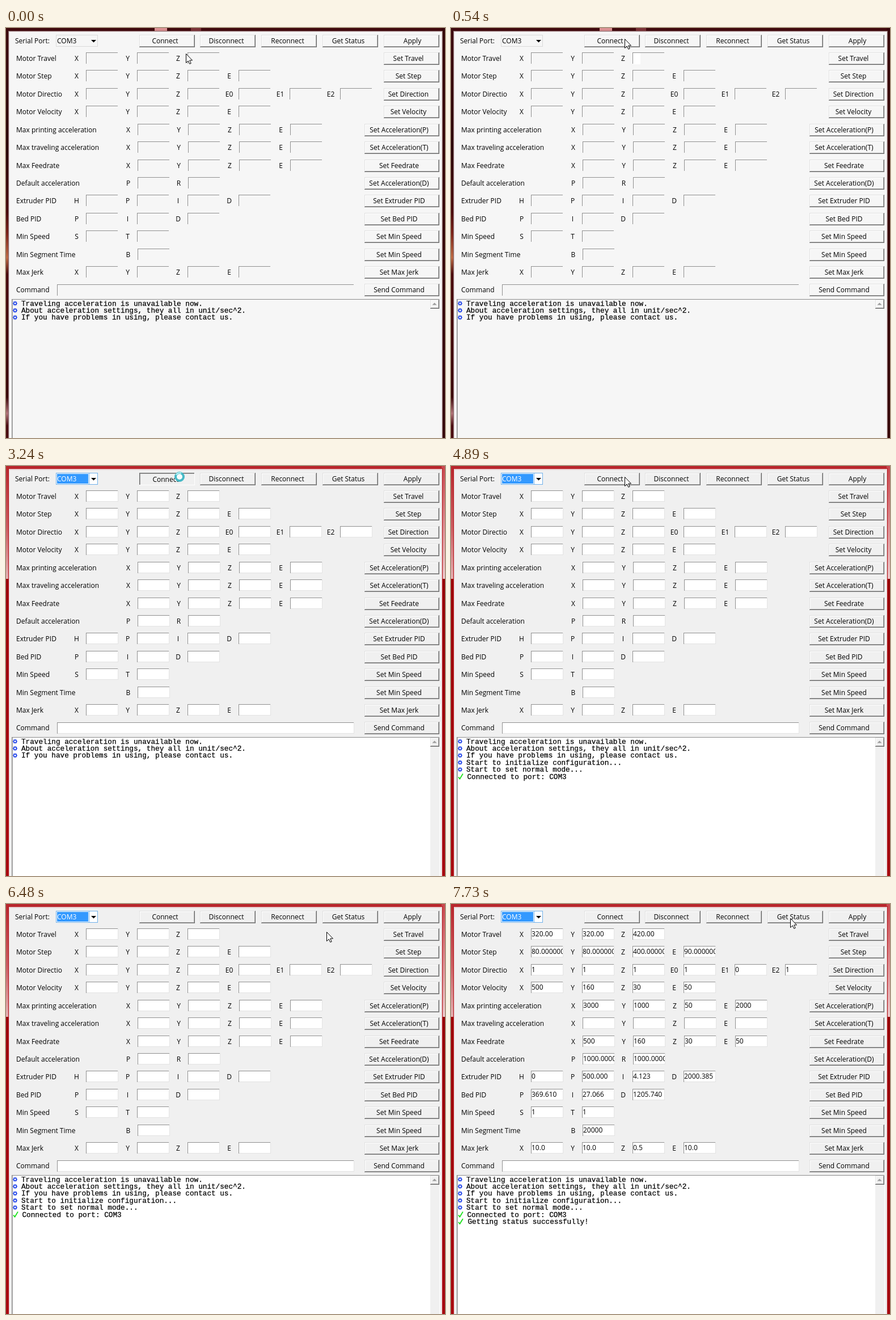
Animation, 774 px wide and 723 px high, one loop 8 s. Source, as an HTML page:

```html
<!DOCTYPE html>
<html lang="en">
<head>
<meta charset="utf-8">
<title>Printer settings</title>
<style>
html, body { margin: 0; width: 100%; height: 100%; overflow: hidden; background: #f0f0f0; }
svg { display: block; }
text { font: 12px "Open Sans", "Noto Sans", sans-serif; fill: #000; white-space: pre; }
.mid { text-anchor: middle; }
.log text { font: 12.69px "Liberation Mono", monospace; stroke: #000; stroke-width: .25; }
.gear { fill: none; stroke: #1238e8; stroke-width: 1.3; }
.tick { fill: none; stroke: #14e014; stroke-width: 1.8; }

.faded, .active, .patch, .down1, .up1, .busy, .arrow, .linked, .down2, .up2, .vals, .pid, #cursor {
  animation: 8s step-end infinite;
}
.faded { animation-name: faded; }
.active { animation-name: active; }
.patch { animation-name: patch; }
.down1 { animation-name: down1; }
.up1 { animation-name: up1; }
.busy { animation-name: busy; }
.arrow { animation-name: arrow; }
.linked { animation-name: linked; }
.down2 { animation-name: down2; }
.up2 { animation-name: up2; }
.vals { animation-name: vals; }
.pid { animation-name: pid; }
#cursor { animation-name: move; }

@keyframes faded { 0% { opacity: 1 } 22.25%, 100% { opacity: 0 } }
@keyframes active { 0% { opacity: 0 } 22.25%, 100% { opacity: 1 } }
@keyframes patch { 0% { opacity: 0 } 1.5% { opacity: 1 } 22.25%, 100% { opacity: 0 } }
@keyframes down1 { 0% { opacity: 0 } 22.25% { opacity: 1 } 61.125%, 100% { opacity: 0 } }
@keyframes up1 { 0% { opacity: 1 } 22.25% { opacity: 0 } 61.125%, 100% { opacity: 1 } }
@keyframes busy { 0% { opacity: 0 } 40.5% { opacity: 1 } 61.125%, 100% { opacity: 0 } }
@keyframes arrow { 0% { opacity: 1 } 40.5% { opacity: 0 } 61.125%, 100% { opacity: 1 } }
@keyframes linked { 0% { opacity: 0 } 61.125%, 100% { opacity: 1 } }
@keyframes down2 { 0% { opacity: 0 } 91.375% { opacity: 1 } 94.75%, 100% { opacity: 0 } }
@keyframes up2 { 0% { opacity: 1 } 91.375% { opacity: 0 } 94.75%, 100% { opacity: 1 } }
@keyframes vals { 0% { opacity: 0 } 94.75%, 100% { opacity: 1 } }
@keyframes pid { 0% { opacity: 0 } 96.625%, 100% { opacity: 1 } }
@keyframes move {
  0% { transform: translate(317px, 45px) }
  1.5% { transform: translate(322px, 32px) }
  3.375% { transform: translate(319px, 24px) }
  5.25% { transform: translate(311px, 21px) }
  6.75% { transform: translate(306px, 19px) }
  72.375% { transform: translate(316px, 50px) }
  74.25% { transform: translate(335px, 63px) }
  75.75% { transform: translate(364px, 72px) }
  77.625% { transform: translate(446px, 77px) }
  79.125% { transform: translate(533px, 60px) }
  81% { transform: translate(565px, 49px) }
  82.5% { transform: translate(582px, 42px) }
  84.375% { transform: translate(592px, 33px) }
  86% { transform: translate(598px, 27px) }
  87.875%, 100% { transform: translate(598px, 25px) }
}
</style>
</head>
<body>
<svg id="stage" width="774" height="723" viewBox="0 0 774 723">
  <defs>
    <linearGradient id="dark" x2="0" y2="1">
      <stop offset="0" stop-color="#3d0a0e"/><stop offset=".3" stop-color="#2c0407"/>
      <stop offset=".45" stop-color="#4a0a0c"/><stop offset=".5" stop-color="#7a2218"/>
      <stop offset=".56" stop-color="#bd6a44"/><stop offset=".6" stop-color="#4a0a0c"/>
      <stop offset=".9" stop-color="#3a0608"/><stop offset=".94" stop-color="#b07478"/>
      <stop offset=".97" stop-color="#4a0c10"/>
    </linearGradient>
    <linearGradient id="red" x2="0" y2="1">
      <stop offset="0" stop-color="#b8262c"/><stop offset=".15" stop-color="#cc5c60"/>
      <stop offset=".275" stop-color="#e4b0b2"/>
      <stop offset=".275" stop-color="#9c0408"/><stop offset="1" stop-color="#a80a10"/>
    </linearGradient>
    <linearGradient id="rose" x2="0" y2="1">
      <stop offset="0" stop-color="#c8484e"/><stop offset=".275" stop-color="#ecc8ca"/>
      <stop offset=".275" stop-color="#940408"/><stop offset="1" stop-color="#a40a10"/>
    </linearGradient>
  </defs>
</svg>
<script>
const stage = document.getElementById('stage');
const fieldX = [141, 231, 320, 410, 500, 589];
const rowBase = i => Math.round(54 + 31.42 * i) + 4;

const box = (x, y, w, h, fill) => `<rect x="${x}" y="${y}" width="${w}" height="${h}" fill="${fill}"/>`;
const text = (x, y, s, attr = '') => `<text x="${x}" y="${y}" ${attr}>${s}</text>`;
const group = (cls, body) => `<g class="${cls}">${body}</g>`;

function field(x, y, w) {
  return group('active', box(x, y, w, 20, '#e3e3e3') + box(x, y, w - 1, 19, '#fff')) +
    box(x, y, w - 1, 1, '#909090') + box(x, y, 1, 20, '#909090');
}

function raised(x, y, w, h) {
  return box(x, y, w - 1, 1, '#e0e0e0') + box(x, y, 1, h - 1, '#e0e0e0') +
    box(x + 1, y + 1, w - 3, 1, '#fff') + box(x + 1, y + 1, 1, h - 3, '#fff') +
    box(x + 1, y + h - 2, w - 2, 1, '#a6a6a6') + box(x + w - 2, y + 1, 1, h - 2, '#a6a6a6') +
    box(x, y + h - 1, w, 1, '#696969') + box(x + w - 1, y, 1, h, '#696969');
}

function sunken(x, y, w, h) {
  return box(x, y, w, 1, '#696969') + box(x, y, 1, h, '#696969') +
    box(x + 1, y + 1, w - 2, 1, '#a6a6a6') + box(x + 1, y + 1, 1, h - 2, '#a6a6a6') +
    box(x, y + h - 1, w, 1, '#fff') + box(x + w - 1, y, 1, h, '#fff');
}

// id selects the up/down animation pair of a clickable button
function button(x, base, w, mid, label, id) {
  const y = base - 15;
  const up = raised(x, y, w, 22) + text(mid, base, label, 'class="mid"');
  if (!id) return up;
  return group('up' + id, up) +
    group('down' + id, sunken(x, y, w, 22) + text(mid + 1, base + 1, label, 'class="mid"'));
}

// label, field names, button label, first field column, values
const rows = [
  ['Motor Travel', 'X Y Z', 'Set Travel', 0, '320.00 320.00 420.00'],
  ['Motor Step', 'X Y Z E', 'Set Step', 0, '80.000000 80.000000 400.000000 90.000000'],
  ['Motor Directio', 'X Y Z E0 E1 E2', 'Set Direction', 0, '1 1 1 1 0 1'],
  ['Motor Velocity', 'X Y Z E', 'Set Velocity', 0, '500 160 30 50'],
  ['Max printing acceleration', 'X Y Z E', 'Set Acceleration(P)', 1, '3000 1000 50 2000'],
  ['Max traveling acceleration', 'X Y Z E', 'Set Acceleration(T)', 1, ''],
  ['Max Feedrate', 'X Y Z E', 'Set Feedrate', 1, '500 160 30 50'],
  ['Default acceleration', 'P R', 'Set Acceleration(D)', 1, '1000.000000 1000.000000'],
  ['Extruder PID', 'H P I D', 'Set Extruder PID', 0, '0 500.000 4.123 2000.385'],
  ['Bed PID', 'P I D', 'Set Bed PID', 0, '369.610 27.066 1205.740'],
  ['Min Speed', 'S T', 'Set Min Speed', 0, '1 1'],
  ['Min Segment Time', 'B', 'Set Min Speed', 1, '20000'],
  ['Max Jerk', 'X Y Z E', 'Set Max Jerk', 0, '10.0 10.0 0.5 10.0']
];

function row([label, names, action, first, values], i) {
  const base = rowBase(i), top = base - 15;
  const vals = values.split(' ');
  let out = text(18, base, label);
  names.split(' ').forEach((name, k) => {
    const x = fieldX[first + k] + first;
    out += text(x - 16.5, base, name, 'class="mid"') + field(x, top, 57);
    if (vals[k]) {
      out += `<svg x="${x + 1}" y="${top + 1}" width="55" height="18">` +
        group(label.endsWith('PID') ? 'pid' : 'vals', text(0, 13, vals[k])) + '</svg>';
    }
  });
  return out + (i < 4 ? button(666, base, 98, 709.5, action) : button(632, base, 132, 693, action));
}

function gear(y) {
  let spokes = '';
  for (let k = 0; k < 8; k++) {
    const c = Math.cos(k * Math.PI / 4), s = Math.sin(k * Math.PI / 4);
    spokes += `M${16 + 2.4 * c} ${y + 2.4 * s}L${16 + 4 * c} ${y + 4 * s}`;
  }
  return `<g class="gear"><circle cx="16" cy="${y}" r="2.3"/><path d="${spokes}"/></g>`;
}

function line(i, s, x = 27, done = false) {
  const y = 485.6 + 12.4 * i;
  const mark = done ? `<path class="tick" d="M13 ${y + 1}L15.6 ${y + 4}L21 ${y - 5}"/>` : gear(y);
  return mark + text(x, y + 4, s);
}

const backdrop =
  group('active',
    box(0, 0, 774, 723, 'url(#red)') + box(768, 0, 6, 723, 'url(#rose)') +
    box(4, 4, 766, 719, '#b41218') + box(5, 5, 764, 718, '#e6c8ca') + box(6, 7, 762, 716, '#f0f0f0')) +
  group('faded',
    box(0, 0, 774, 723, 'url(#dark)') + box(6, 0, 768, 6, '#40090d') +
    box(768, 0, 6, 723, '#36060a') + box(262, 0, 22, 6, '#d98f90') + box(326, 0, 18, 6, '#7a3236') +
    box(4, 5, 766, 718, '#8a6a6c') + box(5, 6, 764, 717, '#dccfd0') + box(6, 7, 762, 716, '#f6f6f6'));

const combo =
  box(88, 12, 74, 21, '#dadada') +
  group('faded', box(89, 13, 72, 19, '#f6f6f6') + text(90, 27, 'COM3')) +
  group('active',
    box(88, 12, 74, 21, '#6fb0ea') + box(89, 13, 72, 19, '#fff') + box(90, 14, 55, 17, '#3399ff') +
    box(146, 13, 1, 19, '#6fb0ea') + text(90, 27, 'COM3', 'style="fill:#fff"')) +
  '<path d="M150 21H159L154.5 25.5Z"/>';

const toolbar = text(16, 27, 'Serial Port:') + combo +
  button(235, 27, 98, 280.5, 'Connect', 1) +
  button(342, 27, 98, 388.5, 'Disconnect') +
  button(450, 27, 98, 496.5, 'Reconnect') +
  button(558, 27, 98, 603.5, 'Get Status', 2) +
  button(666, 27, 98, 716.5, 'Apply');

const command = text(18, rowBase(13), 'Command') + field(90, 452, 524) +
  button(632, rowBase(13), 132, 693, 'Send Command');

const log =
  group('active', box(10, 478, 738, 245, '#fff') + box(764, 478, 1, 245, '#fff')) +
  box(10, 478, 754, 1, '#8c8c8c') + box(10, 478, 1, 245, '#8c8c8c') + box(11, 479, 1, 244, '#b4b4b4') +
  raised(748, 479, 16, 16) + '<path d="M751.5 488.5H759.5L755.5 484.5Z" fill="#9a9a9a"/>' +
  group('log',
    line(0, 'Traveling acceleration is unavailable now.') +
    line(1, 'About acceleration settings, they all in unit/sec^2.') +
    line(2, 'If you have problems in using, please contact us.') +
    group('linked',
      line(3, 'Start to initialize configuration...') +
      line(4, 'Start to set normal mode...') +
      line(5, 'Connected to port: COM3', 28.5, true)) +
    group('pid', line(6, 'Getting status successfully!', 29.5, true)));

const pointer =
  group('busy',
    '<circle cx="306" cy="19" r="7" fill="#f4fbfc" stroke="#45b9c6" stroke-width="4"/>' +
    '<path d="M300 15.5A7 7 0 0 1 309 12.7" fill="none" stroke="#b4eef2" stroke-width="2.5"/>') +
  '<g id="cursor"><path class="arrow" d="M.5 .5V16.5L4.2 13L6.8 18.4L9.2 17.3L6.7 12H11.5Z" fill="#fff" stroke="#000"/></g>';

stage.innerHTML += backdrop + toolbar + rows.map(row).join('') + command + log +
  group('patch', box(321, 44, 13, 20, '#fff')) + pointer;
</script>
</body>
</html>
```
